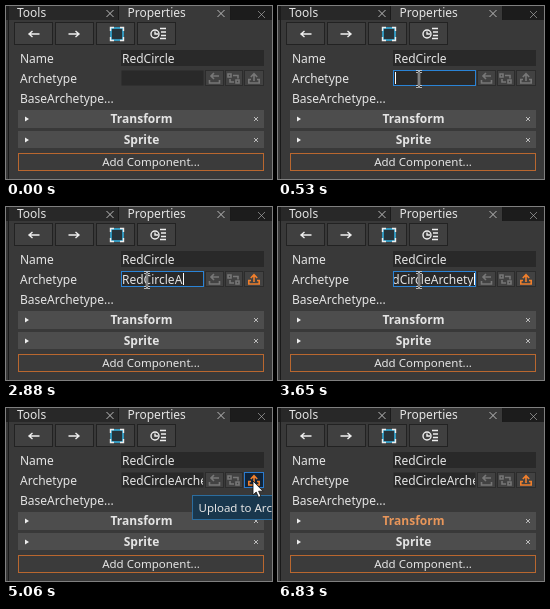
Animation of 266 by 173 pixels, one loop 6860 ms. Source, as an HTML page:

```html
<!DOCTYPE html>
<html lang="en">
<head>
<meta charset="utf-8">
<title>Archetype upload</title>
<style>
  html, body { margin: 0; width: 100%; height: 100%; overflow: hidden; background: #393939; }
  svg { display: block; width: 100vw; height: 100vh; }
  text { font: 12px "Noto Sans", "Open Sans", sans-serif; fill: #e4e4e4; white-space: pre; }
  .small { font-size: 11.5px; }
  .title { font-weight: 700; text-anchor: middle; }
  .well { fill: #292929; }
  .button { fill: #404040; stroke: #222; }
  .mini { fill: #424242; stroke: #2c2c2c; }
  .bar { fill: #4d4d4d; }
  .line { fill: none; stroke: #eee; stroke-width: 1.4; }
  .close { fill: none; stroke: #bbb; }
  .dim { fill: none; stroke: #777; stroke-width: 1.6; }
</style>
</head>
<body>
<svg viewBox="0 0 266 173">
  <defs>
    <path id="close" class="close" d="M-2-2l4 4m0-4l-4 4"/>
    <path id="tabClose" class="close" d="M-3.5-3.5l7 7m0-7l-7 7"/>
    <path id="beamShape" d="M-3-7.5h2l1 1l1-1h2M0-6.5v13M-3 7.5h2l1-1l1 1h2"/>
    <clipPath id="fieldClip"><rect x="116" y="65" width="81" height="14"/></clipPath>
  </defs>

  <!-- Tabs -->
  <rect width="266" height="14" fill="#1c1c1c"/>
  <rect x="3" width="109" height="14" fill="#282828"/>
  <rect x="113" width="111" height="15" fill="#393939"/>
  <path d="M2.5 0V173M112.5 0V14M224.5 0V14" stroke="#1a1a1a"/>
  <text x="11" y="11">Tools</text>
  <text x="121.5" y="11">Properties</text>
  <use href="#tabClose" x="104" y="7.5"/>
  <use href="#tabClose" x="215" y="7.5"/>
  <use href="#tabClose" x="255.5" y="8.5" opacity=".6"/>

  <!-- Toolbar -->
  <g class="button">
    <rect x="8.5" y="16.5" width="38" height="22"/>
    <rect x="49.5" y="16.5" width="38" height="22"/>
    <rect x="90.5" y="16.5" width="38" height="22"/>
    <rect x="131.5" y="16.5" width="38" height="22"/>
  </g>
  <path class="line" d="M33.5 28H23m3.5-3l-3.5 3l3.5 3M62.5 28H73m-3.5-3l3.5 3l-3.5 3"/>
  <rect x="105" y="22" width="12" height="12" fill="#26333a" stroke="#35b5e5" stroke-width="1.5"/>
  <path class="line" d="M104.5 25v-3.5h3.5m6 0h3.5V25m0 6v3.5H114m-6 0h-3.5V31"/>
  <circle class="line" cx="149" cy="28" r="4"/>
  <path class="line" d="M149 25.5V28h3M154 22.5h6M155 26h5M155 29.5h5M154 32.5h6"/>

  <!-- Properties -->
  <text x="14" y="57">Name</text>
  <text x="14" y="77">Archetype</text>
  <text x="14" y="97">BaseArchetype...</text>
  <rect class="well" x="115" y="44" width="143" height="16"/>
  <text x="116" y="57">RedCircle</text>

  <rect id="field" class="well" x="115.5" y="64.5" width="82" height="15"/>
  <g clip-path="url(#fieldClip)">
    <text id="value" y="77"></text>
    <path id="caret" d="M.5 66v12" stroke="#fff"/>
  </g>

  <g class="mini">
    <rect x="199.5" y="64.5" width="18" height="15"/>
    <rect x="219.5" y="64.5" width="17" height="15"/>
    <rect id="upload" x="238.5" y="64.5" width="19" height="15"/>
  </g>
  <path class="dim" d="M213 70h-8m3-3l-3 3l3 3M203.5 74v3h10v-3"/>
  <path class="dim" d="M222 68h3v3h-3zM230 74h3v3h-3zM227 69.5h5v3M224 73v3h4"/>
  <g id="uploadIcon" fill="none" stroke-width="1.6">
    <path d="M248 75v-7m-3.2 3l3.2-3.4l3.2 3.4M245 73.5h-2.2V77h10.4v-3.5H251"/>
  </g>

  <!-- Components -->
  <rect class="bar" x="12" y="104" width="246" height="18"/>
  <rect class="bar" x="12" y="125" width="246" height="17"/>
  <path d="M19 110.5l4 2.5l-4 2.5zM19 131.5l4 2.5l-4 2.5z" fill="#eee"/>
  <text id="transform" class="title" x="135.5" y="117">Transform</text>
  <text class="title" x="135.5" y="138">Sprite</text>
  <use href="#close" x="250" y="113"/>
  <use href="#close" x="250" y="134"/>
  <rect x="12.5" y="147.5" width="245" height="17" fill="#3b3b3b" stroke="#b9672f"/>
  <text class="small" x="145" y="160" text-anchor="middle">Add Component...</text>

  <g id="tooltip">
    <rect x="186.5" y="87.5" width="120" height="24" fill="#19374d" stroke="#2c6d9e"/>
    <text class="small" x="192.5" y="103.5">Upload to Archetype</text>
  </g>

  <path id="arrow" d="M0 0V14l3.2-3l2.3 5.3l2.4-1l-2.3-5.1h4.4z" fill="#fff" stroke="#111" stroke-width=".8"/>
  <g id="beam" fill="none">
    <use href="#beamShape" stroke="#ddd" stroke-width="2.4"/>
    <use href="#beamShape" stroke="#111" stroke-width=".9"/>
  </g>
</svg>
<script>
const LOOP = 6860;
const NAME = "RedCircleArchetype";
const KEY_TIMES = [1120, 1320, 1450, 1910, 2010, 2110, 2280, 2380, 2480,
                   2880, 3080, 3250, 3350, 3450, 3550, 3650, 3910, 4040];
const FOCUS = 500, HOVER = 4830, CLICK = 5040, LEAVE = 5330, UNFOCUS = 6830;
// Pointer stops: time, x, y, and how strongly the move towards it slows down
const STOPS = [[60, 158, 168, 1], [490, 141, 73, 2], [4605, 141, 73, 1], [4720, 202, 83, 1],
               [5030, 247, 73, 2], [LEAVE - 20, 247, 73, 1], [5480, 223, 174, 1]];

const el = id => document.getElementById(id);
const [field, value, caret, upload, uploadIcon, transform, tooltip, arrow, beam] =
  ["field", "value", "caret", "upload", "uploadIcon", "transform", "tooltip", "arrow", "beam"].map(el);
const show = (node, on) => node.setAttribute("visibility", on ? "visible" : "hidden");
const between = (t, from, to) => t >= from && t < to;

function pointerAt(t) {
  const next = STOPS.findIndex(stop => stop[0] > t);
  if (next < 1) return null;
  const [t0, x0, y0] = STOPS[next - 1], [t1, x1, y1, slowing] = STOPS[next];
  const k = 1 - (1 - (t - t0) / (t1 - t0)) ** slowing;
  return [x0 + (x1 - x0) * k, y0 + (y1 - y0) * k];
}

function drawField(t) {
  const focused = between(t, FOCUS, CLICK);
  const typed = NAME.slice(0, KEY_TIMES.filter(key => key <= t).length);
  field.style.stroke = focused ? "#2a83d6" : "none";
  value.textContent = typed;
  const width = typed ? value.getComputedTextLength() : 0;
  const scroll = focused ? Math.max(0, width - 79.5) : 0;
  value.setAttribute("x", 116 - scroll);
  caret.setAttribute("transform", `translate(${Math.round(116.5 + width - scroll)} 0)`);
  show(caret, focused);
}

function drawUpload(t) {
  upload.style.fill = between(t, HOVER, LEAVE) ? "#10243a" : "";
  upload.style.stroke = between(t, HOVER, UNFOCUS) ? "#2a7bd0" : "";
  uploadIcon.style.stroke = t >= KEY_TIMES[0] ? "#f07f2c" : "#777";
  show(tooltip, between(t, HOVER + 40, 5160));
  transform.style.fill = t >= 5160 ? "#e8965a" : "";
}

function drawPointer(t) {
  const point = pointerAt(t);
  const overField = point && between(point[0], 115, 198) && between(point[1], 64, 81);
  show(arrow, point && !overField);
  show(beam, overField);
  if (point) {
    const move = `translate(${point.map(Math.round).join(" ")})`;
    arrow.setAttribute("transform", move);
    beam.setAttribute("transform", move);
  }
}

function draw(t) {
  drawField(t);
  drawUpload(t);
  drawPointer(t);
}

const start = performance.now();
function tick() {
  draw((performance.now() - start) % LOOP);
  requestAnimationFrame(tick);
}
tick();
</script>
</body>
</html>
```
